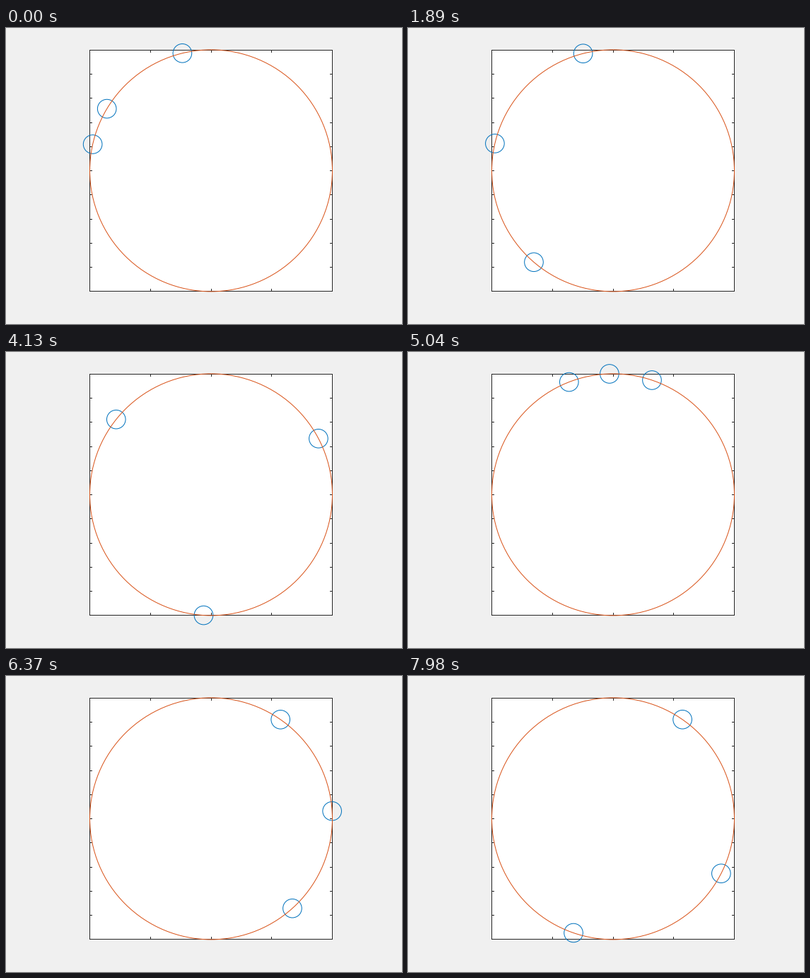
Animation of 560x420 px, one loop 8 s. Source, as a matplotlib script:

```python
import numpy as np
import matplotlib.pyplot as plt
from matplotlib.animation import FuncAnimation
from matplotlib.patches import Circle, Rectangle

W, H, DPI = 560, 420, 100
PX = 72 / DPI                       # one pixel in points
LOOP, TICK, STEP = 8000, 20, 70     # ms

CX, CY, RING, BEAD = 290, 202.4, 171.5, 13.3
LEFT, RIGHT, TOP, BOTTOM = 118, 461, 31, 373    # pixel columns and rows
MARK = 4
INK, BLUE, ORANGE = "#262626", "#0072BD", "#D95319"

# Three coupled phase oscillators, in radians per step
OMEGA = np.array([0.10, 0.25, 0.40])
COUPLING = 0.23
START = np.radians([103.7, 149.2, 167.4])
SUB = 4


def rate(p):
    pull = np.sin(p[None, :] - p[:, None]).sum(axis=1)
    return OMEGA + COUPLING / len(p) * pull


def rk4(p, h):
    a = rate(p)
    b = rate(p + h / 2 * a)
    c = rate(p + h / 2 * b)
    d = rate(p + h * c)
    return p + h / 6 * (a + 2 * b + 2 * c + d)


def solve(count):
    phases = [START]
    for _ in range(count - 1):
        p = phases[-1]
        for _ in range(SUB):
            p = rk4(p, 1 / SUB)
        phases.append(p)
    return phases


PHASES = solve(LOOP // STEP + 1)

fig = plt.figure(figsize=(W / DPI, H / DPI), dpi=DPI, facecolor="#F0F0F0")
ax = fig.add_axes([0, 0, 1, 1])
ax.set_xlim(0, W)
ax.set_ylim(H, 0)
ax.axis("off")


def block(x, y, w, h, color=INK):
    ax.add_patch(Rectangle((x, y), w, h, fc=color, ec="none", lw=0,
                           snap=False, zorder=2))


def ring(r, color, z):
    return ax.add_patch(Circle((CX, CY), r, fill=False, ec=color, lw=PX, zorder=z))


wide, tall = RIGHT - LEFT + 1, BOTTOM - TOP + 1
block(LEFT, TOP, wide, tall)
block(LEFT + 1, TOP + 1, wide - 2, tall - 2, "white")

for k in range(1, 4):
    x = int(118.65 + 343 * k / 4)
    block(x, TOP, 1, MARK)
    block(x, BOTTOM + 1 - MARK, 1, MARK)
for k in range(1, 10):
    y = int(31.5 + 342.3 * k / 10)
    block(LEFT, y, MARK, 1)
    block(RIGHT + 1 - MARK, y, MARK, 1)

beads = [ring(BEAD, BLUE, 3) for _ in START]
ring(RING, ORANGE, 4)


def draw(i):
    n = (i * TICK + TICK // 2) // STEP
    for bead, p in zip(beads, PHASES[n]):
        bead.center = CX + RING * np.cos(p), CY - RING * np.sin(p)
    return beads


anim = FuncAnimation(fig, draw, frames=LOOP // TICK, interval=TICK,
                     init_func=lambda: draw(0), repeat=True, repeat_delay=0)
plt.show()
```
